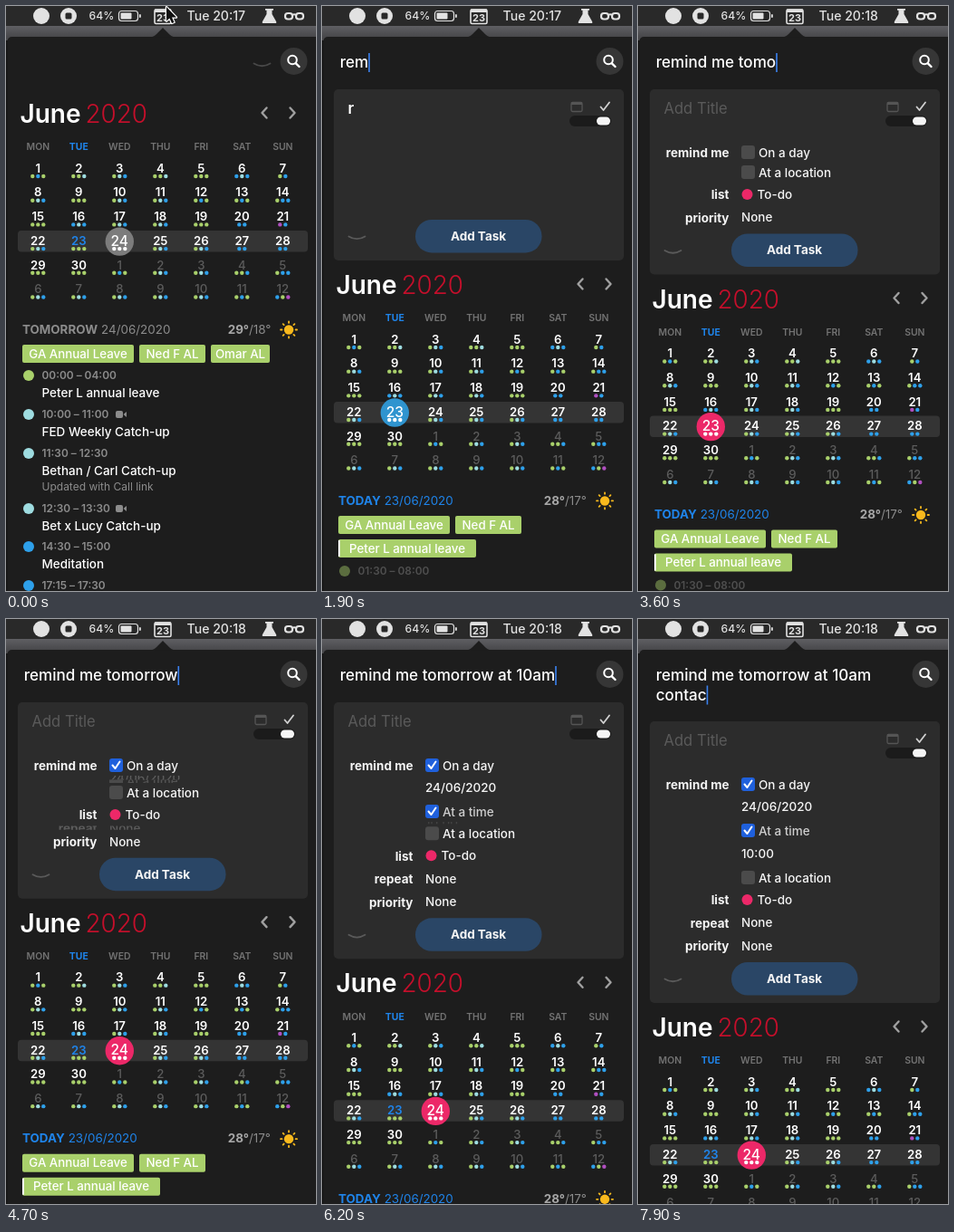
Recreate the animation shown at these times as an HTML page with a canvas. Size 342 by 646 pixels, loop 8 s.

```html
<!DOCTYPE html>
<html lang="en">
<head>
<meta charset="utf-8">
<title>Reminder entry</title>
<style>
  html, body { margin: 0; width: 100%; height: 100%; overflow: hidden; background: #1d1d1d; }
  canvas { display: block; }
</style>
</head>
<body>
<canvas id="stage" width="342" height="646"></canvas>
<script>
const ctx = document.getElementById('stage').getContext('2d');
const LOOP = 8000;
const COLOR = {
  green: '#a9d06b', cyan: '#9edce0', blue: '#2ea0ea', purple: '#b04fc0', pink: '#ec2868',
  accent: '#1f84ea', grey: '#8c8c8c', dim: '#5c5c5c'
};

// Typing: [characters shown, time], straight between the points
const PHRASE = 'remind me tomorrow at 10am contac';
const FIRST_LINE = 27;
const KEYS = [[0, 1200], [1, 1300], [2, 1650], [8, 2430], [14, 3560], [18, 4450], [19, 5000], [20, 5250],
  [21, 5400], [22, 5500], [23, 5800], [26, 6200], [27, 6450], [28, 6950], [30, 7200], [33, 7820]];

// Dots under each day: g green, c cyan, b blue, p purple
const WEEKS = [
  'gbg ggc gcb ggc ggg bcb gb',
  'gcb ggg gcb gcb gbg gbg gbb',
  'ggg bcb gcb gcb ggg bb pb',
  'gcb ggg gcb gcb gcb bb bb',
  'ggg ggg gbg gcb gcb ggb gbb',
  'gcb gcb gcb gcb gcb gbg bgp'
].map(week => week.split(' '));
const DOT = { g: COLOR.green, c: COLOR.cyan, b: COLOR.blue, p: COLOR.purple };
const columnX = i => 35.3 + 45 * i;

const AGENDA = [
  [408, 'green', '00:00 – 04:00', 'Peter L annual leave'],
  [451, 'cyan', '10:00 – 11:00', 'FED Weekly Catch-up', 'video'],
  [494, 'cyan', '11:30 – 12:30', 'Bethan / Carl Catch-up', '', 'Updated with Call link'],
  [555, 'cyan', '12:30 – 13:30', 'Bet x Lucy Catch-up', 'video'],
  [597, 'blue', '14:30 – 15:00', 'Meditation'],
  [640, 'blue', '17:15 – 17:30', '']
];

function ramp(t, from, to) {
  const u = Math.min(1, Math.max(0, (t - from) / (to - from)));
  return u * u * (3 - 2 * u);
}

function typedCount(t) {
  const next = KEYS.findIndex(key => key[1] > t);
  if (next === 0) return 0;
  if (next < 0) return PHRASE.length;
  const [n0, t0] = KEYS[next - 1], [n1, t1] = KEYS[next];
  return Math.floor(n0 + (n1 - n0) * (t - t0) / (t1 - t0) + 1e-6);
}

// y is the middle of the capitals
function text(str, x, y, size, color = '#fff', weight = 500, align = 'left') {
  ctx.font = `${weight} ${size}px Inter, sans-serif`;
  ctx.textAlign = align;
  ctx.fillStyle = color;
  ctx.fillText(str, x, y + size * 0.36);
  return ctx.measureText(str).width;
}

function paint(color, outline) {
  ctx.fillStyle = ctx.strokeStyle = color;
  if (outline) { ctx.lineWidth = outline; ctx.stroke(); } else ctx.fill();
}

function box(x, y, w, h, r, color, outline) {
  ctx.beginPath();
  ctx.roundRect(x, y, w, h, r);
  paint(color, outline);
}

function disc(x, y, r, color, outline) {
  ctx.beginPath();
  ctx.arc(x, y, r, 0, 2 * Math.PI);
  paint(color, outline);
}

function shape(path, color, outline) {
  const p = new Path2D(path);
  ctx.lineCap = ctx.lineJoin = 'round';
  ctx.fillStyle = ctx.strokeStyle = color;
  if (outline) { ctx.lineWidth = outline; ctx.stroke(p); } else ctx.fill(p);
}

const smile = (x, y, color) => shape(`M${x - 9} ${y}Q${x} ${y + 5.5} ${x + 9} ${y}`, color, 1.8);

function menuBar(t) {
  const white = '#e2e2e2';
  const strip = ctx.createLinearGradient(0, 22, 0, 34);
  strip.addColorStop(0, '#5f5f63');
  strip.addColorStop(1, '#48484b');
  ctx.fillStyle = strip;
  ctx.fillRect(0, 22, 342, 20);
  ctx.fillStyle = '#292929';
  ctx.fillRect(0, 0, 342, 22);
  disc(39, 11, 9, white);
  disc(69, 11, 9, white);
  box(65.5, 7.5, 7, 7, 1.5, '#292929');
  text('64%', 91.5, 11, 12.2, white);
  box(124.5, 5.5, 21, 11, 3, white, 1.2);
  box(126.5, 7.5, 12, 7, 1, white);
  box(147, 9, 1.8, 4, 1, white);
  box(164, 4, 18, 15.5, 1.5, white, 1.6);
  ctx.fillRect(164, 3.5, 18, 3.5);
  text('23', 173, 13, 11, white, 700, 'center');
  text(t < 2900 ? 'Tue 20:17' : 'Tue 20:18', 199.5, 11, 14.1, white);
  shape('M286 3h9v1.8h-1.5V9l4.5 8q1 2-1 2h-13q-2 0-1-2l4.500-8V4.800h-1.500z', white);
  box(308, 8, 8, 6.5, 3, white, 2.2);
  box(320, 8, 8, 6.5, 3, white, 2.2);
  shape('M316 10q2-1.500 4 0', white, 1.8);
}

function popover() {
  ctx.fillStyle = '#151515';
  ctx.fillRect(0, 38, 2, 608);
  box(1.5, 34, 345, 630, 5, '#1d1d1d');
  shape('M159 34.5Q164 34 168 29L173 24L178 29Q182 34 187 34.5z', '#1d1d1d');
}

function searchField(t, count) {
  const typed = PHRASE.slice(0, count);
  const lines = count >= 30 ? [typed.slice(0, FIRST_LINE), typed.slice(FIRST_LINE)] : [typed];
  let width = 0, y = 62;
  lines.forEach((line, i) => {
    y = 62 + 21.5 * i;
    width = text(line, 19.7, y, 17.1);
  });
  if (count || (t > 400 && t < 950)) {
    ctx.fillStyle = '#3b82f0';
    ctx.fillRect(19.7 + width, y - 10, 1.6, 21);
  }
  disc(317.5, 61, 15, '#363636');
  disc(316, 59.5, 4.8, '#fff', 2);
  shape('M319.8 63.3L323.5 67', '#fff', 2.4);
  if (t < 1300) {
    smile(282.5, 63.5, '#484848');
    const pointer = 'M177 1V16.5L180.5 13.5L183 19L185.5 18L183 12.5H188z';
    shape(pointer, '#fff', 2.4);
    shape(pointer, '#111');
  }
}

function calendar(selected, circle) {
  text('June', 15.5, 119, 28, '#fff', 600);
  text('2020', 87.5, 119, 27.8, '#c40f2b', 350);
  shape('M287.5 112.5L282.5 118L287.5 123.5M313.5 112.5L318.5 118L313.5 123.5', '#a0a0a0', 2.4);
  'MON TUE WED THU FRI SAT SUN'.split(' ').forEach((name, i) =>
    text(name, columnX(i), 155.5, 10.4, i === 1 ? COLOR.accent : '#737373', i === 1 ? 700 : 600, 'center'));
  box(13, 248, 320, 23.5, 4, '#343434');
  WEEKS.forEach((week, row) => week.forEach((dots, col) => {
    const index = row * 7 + col + 1;
    const x = columnX(col), y = 179 + 26.7 * row;
    const isSelected = index === selected, otherMonth = index > 30;
    if (isSelected) disc(x, y + 1, 15.7, circle);
    const color = isSelected ? '#fff' : otherMonth ? COLOR.dim : index === 23 ? COLOR.accent : '#fff';
    text(otherMonth ? index - 30 : index, x, y, isSelected ? 15.5 : 13.2, color,
      isSelected || otherMonth ? 500 : 600, 'center');
    [...dots].forEach((dot, i) =>
      disc(x + (i - (dots.length - 1) / 2) * 6, y + 9, 2.2, isSelected ? '#fff' : DOT[dot]));
  }));
}

function dayHeader(name, date, high, low, color) {
  const width = text(name, 18, 357, 13.4, color, 700);
  text(date, 18 + width + 4, 357, 13.4, color, 400);
  text(high, 268, 357, 13.4, '#a6a6a6', 700, 'right');
  text(low, 268, 357, 13.4, COLOR.grey, 400);
  disc(312, 357.5, 5.2, '#f9b91d');
  for (let i = 0; i < 8; i++) {
    const c = Math.cos(i * Math.PI / 4), s = Math.sin(i * Math.PI / 4);
    shape(`M${312 + 7.6 * c} ${357.5 + 7.6 * s}L${312 + 9 * c} ${357.5 + 9 * s}`, '#f9b91d', 1.8);
  }
}

function chip(label, x, y, w) {
  box(x, y - 10, w, 20, 2, COLOR.green);
  text(label, x + w / 2, y, 13.3, '#fff', 500, 'center');
}

function agenda(today) {
  chip('GA Annual Leave', 18, 384, 123);
  chip('Ned F AL', 147, 384, 73);
  if (today) {
    chip('Peter L annual leave', 18, 410, 152);
    ctx.fillStyle = '#fff';
    ctx.fillRect(18, 401, 2, 18);
    ctx.globalAlpha = 0.45;
    disc(25, 435, 6, COLOR.green);
    text('01:30 – 08:00', 39.5, 435, 11.9, COLOR.grey, 600);
    ctx.globalAlpha = 1;
    return;
  }
  chip('Omar AL', 226, 384, 65);
  for (const [y, color, hours, title, video, note] of AGENDA) {
    disc(25, y, 6, COLOR[color]);
    text(hours, 39.5, y, 11.9, COLOR.grey, 600);
    text(title, 39.5, y + 19, 13.5);
    if (video) {
      box(121, y - 4, 8, 8, 2, COLOR.grey);
      shape(`M129.5 ${y}L133 ${y - 3}V${y + 3}z`, COLOR.grey);
    }
    if (note) text(note, 39.5, y + 37, 12, COLOR.grey, 400);
  }
}

function checkbox(y, checked) {
  box(114, y - 8, 15, 15, 3, checked ? '#1f60dc' : '#4b4b4b');
  if (checked) shape(`M117.5 ${y - 0.5}L120.5 ${y + 3}L125.5 ${y - 4.5}`, '#fff', 2);
}

// Rows stack from the top; each is clipped to its share of its full height
function formRows(t, top, task, day, time) {
  const rows = [
    { open: task, h: 22, mid: 11, label: 'remind me', check: day > 0, value: 'On a day' },
    { open: day, h: 29, mid: 13, value: '24/06/2020' },
    { open: day, h: 22, mid: 11, check: time > 0, value: 'At a time', color: '#cfcfcf' },
    { open: time, h: 30, mid: 14, value: '10:00' },
    { open: task, h: 22, mid: 11, check: false, value: 'At a location' },
    { open: 1, alpha: ramp(t, 2250, 2450), h: 25.5, mid: 13, label: 'list', dot: true, value: 'To-do' },
    { open: day, h: 25.5, mid: 13, label: 'repeat', value: 'None' },
    { open: task, h: 25.5, mid: 13, label: 'priority', value: 'None' }
  ];
  let y = top;
  for (const row of rows) {
    const height = row.h * row.open, mid = y + row.mid * row.open;
    if (height > 0) {
      ctx.save();
      ctx.beginPath();
      ctx.rect(13, y, 320, height);
      ctx.clip();
      const marked = 'check' in row;
      if (marked) checkbox(mid, row.check);
      ctx.globalAlpha = row.alpha ?? Math.min(1, 1.5 * row.open);
      if (row.label) text(row.label, 100.5, mid + 0.5, 13.5, '#f5f5f5', 700, 'right');
      if (row.dot) disc(120.5, mid, 6, COLOR.pink);
      text(row.value, marked ? 133 : row.dot ? 131.5 : 114, mid, 13.5, row.color || '#f5f5f5');
      ctx.restore();
    }
    y += height;
  }
  return y;
}

function card(t, top, bottom, form) {
  ctx.save();
  ctx.beginPath();
  ctx.roundRect(13, top, 320, bottom - top, 5);
  ctx.fillStyle = '#2c2c2c';
  ctx.fill();
  ctx.clip();
  if (t < 2700) text('r', 28.5, top + 21, 17, '#fff', 600);
  else text('Add Title', 28.5, top + 21.5, 16.6, '#5a5a5a', 400);
  box(275, top + 14.5, 12, 10, 1.5, '#555', 1.3);
  ctx.fillRect(275, top + 14.5, 12, 2.5);
  shape(`M307.5 ${top + 19.5}L310.5 ${top + 23}L317 ${top + 14.5}`, '#d0d0d0', 1.8);
  box(273, top + 29, 46, 12, 6, '#1b1b1b');
  box(303, top + 30.5, 15, 9, 4.5, '#f5f5f5');
  form(top + 59);
  const buttonY = bottom - 27;
  box(103, buttonY - 18, 139.5, 36.5, 18, '#2a4666');
  text('Add Task', 172.5, buttonY, 13.5, '#f5f5f5', 700, 'center');
  smile(38.5, buttonY + 0.5, '#5a5a5a');
  ctx.restore();
}

// A recognised word travels from the field to its place in the form
function flyingWord(t, word, start, y) {
  const p = ramp(t, start, start + 450);
  if (p <= 0 || p >= 1) return;
  ctx.font = '500 17.1px Inter, sans-serif';
  const x = 19.7 + ctx.measureText(PHRASE.slice(0, PHRASE.indexOf(word))).width;
  ctx.globalAlpha = 1 - p ** 5;
  text(word, x + (114 - x) * p, 62 + (y - 62) * p, 17.1, '#e8e8e8');
  ctx.globalAlpha = 1;
}

function draw(t) {
  const open = ramp(t, 1650, 2050);
  const task = ramp(t, 2420, 2750);
  const day = ramp(t, 4600, 5000);
  const time = ramp(t, 6150, 6450);
  const spare = 140 * (1 - ramp(t, 2500, 2850));
  const top = 92 + 21 * ramp(t, 7200, 7450);
  const rowsHeight = 69.5 * task + 76.5 * day + 30 * time + 25.5 + spare;
  const bottom = top + open * (59 + rowsHeight + 50.5);
  const today = t >= 1700;

  menuBar(t);
  popover();
  ctx.save();
  ctx.translate(0, bottom - 92);
  calendar(!today || t >= 4650 ? 24 : 23, !today ? '#7c7c7c' : t < 2700 ? '#2f94cf' : COLOR.pink);
  if (today) dayHeader('TODAY', '23/06/2020', '28°', '/17°', COLOR.accent);
  else dayHeader('TOMORROW', '24/06/2020', '29°', '/18°', COLOR.grey);
  agenda(today);
  ctx.restore();
  if (open > 0) card(t, top, bottom, y => formRows(t, y, task, day, time));
  searchField(t, typedCount(t));
  flyingWord(t, 'tomorrow', 5059, 186);
  flyingWord(t, '10am', 6460, 238);
}

function frame() {
  draw(performance.now() % LOOP);
  requestAnimationFrame(frame);
}
frame();
</script>
</body>
</html>
```
